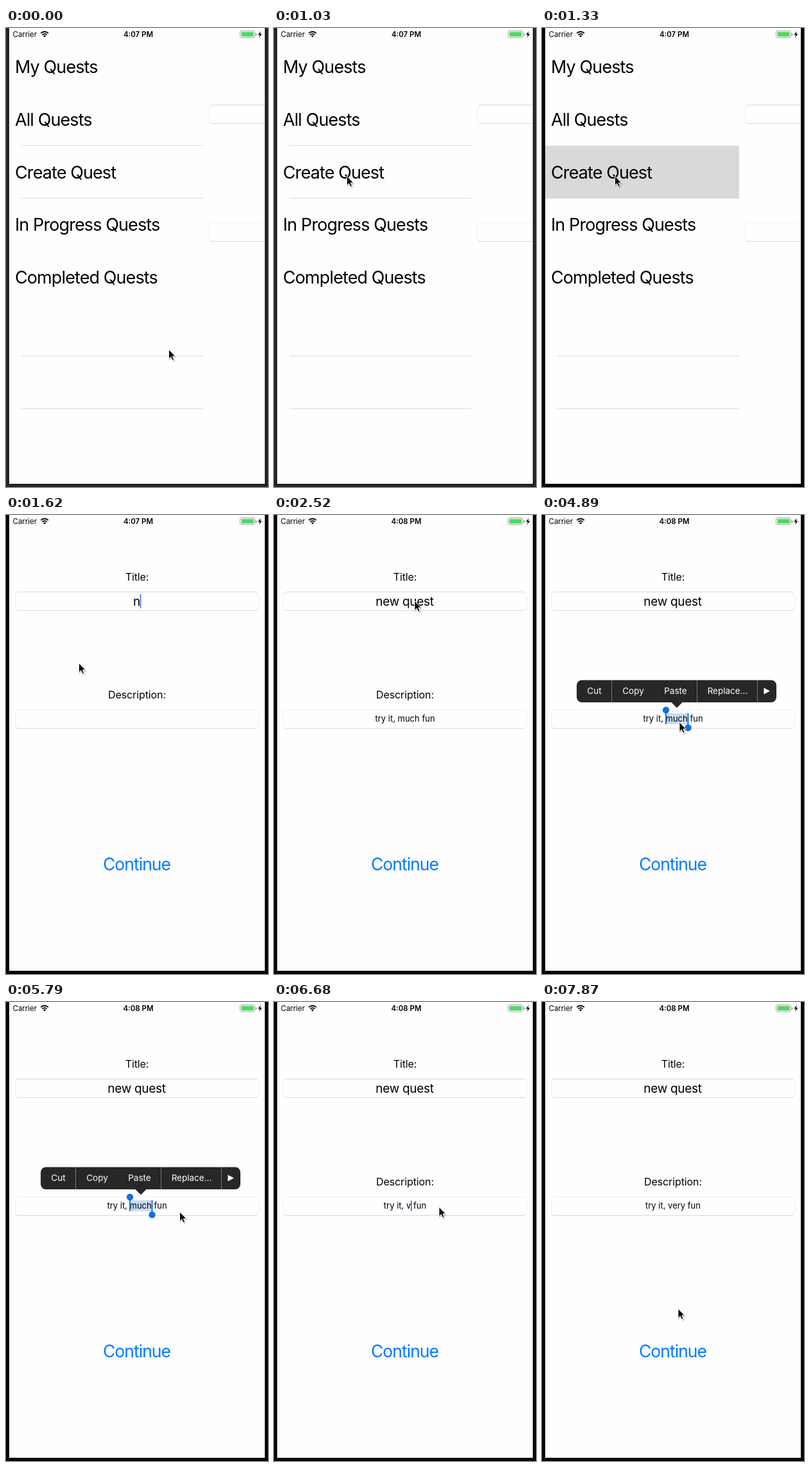
Recreate the animation shown at these times as an HTML page. Size 408 by 713 pixels, loop 8000 ms.

```html
<!DOCTYPE html>
<html lang="en">
<head>
<meta charset="utf-8">
<title>Quest form</title>
<style>
html, body { margin: 0; width: 100%; height: 100%; overflow: hidden; background: #050609; }
svg { display: block; width: 100%; height: 100%; }
text { font-family: Inter, Roboto, sans-serif; font-optical-sizing: none; white-space: pre; }
.mid { text-anchor: middle; }
.big { font-size: 27px; letter-spacing: -.9px; }
.label { font-size: 16px; letter-spacing: -.1px; }
.status { font-size: 11.5px; }
.edit { font-size: 13.5px; fill: #fff; }
.line { fill: none; stroke: #dadada; }
</style>
</head>
<body>
<svg viewBox="0 0 408 713">
  <defs>
    <clipPath id="screen"><rect x="5" width="398" height="708"/></clipPath>
  </defs>
  <rect id="bezel" width="408" height="713"/>
  <g clip-path="url(#screen)">
    <rect x="5" width="398" height="708" fill="#fefefe"/>

    <g id="form">
      <text class="mid label" x="204" y="101.5">Title:</text>
      <rect x="14.5" y="119.5" width="379" height="29" rx="5" fill="none" stroke="#efefef"/>
      <path class="line" d="M17 120.5L19.5 119.5H388.5L391 120.5M17 147.5L19.5 148.5H388.5L391 147.5"/>
      <text id="title" class="mid" x="203.5" y="141" font-size="19" letter-spacing="-.3"></text>
      <text class="mid label" x="204" y="284.5">Description:</text>
      <rect x="14.5" y="302.5" width="379" height="29" rx="5" fill="none" stroke="#efefef"/>
      <path class="line" d="M16 330a5 5 0 0 0 3.5 1.500h369a5 5 0 0 0 3.500-1.500"/>
      <rect id="mark" x="193" y="308" width="34.5" height="17" fill="#c8dcf2"/>
      <text id="desc" class="mid" x="204" y="321" font-size="13"></text>
      <rect id="caret" width="1.7" fill="#4a72e0"/>
      <text class="mid" x="203.5" y="551.5" font-size="26.5" letter-spacing="-.95" fill="#007aff">Continue</text>
    </g>

    <g id="grips" fill="#1370e0">
      <rect x="192" y="303" width="2" height="22"/>
      <circle cx="193" cy="303" r="5.2"/>
      <rect x="226.5" y="308" width="2" height="22"/>
      <circle cx="227.5" cy="330.5" r="5.2"/>
    </g>
    <g id="popup">
      <path d="M62 256.5H357a8 8 0 0 1 8 8V283a8 8 0 0 1-8 8H218.5L210 299.5L201.5 291H62a8 8 0 0 1-8-8V264.5a8 8 0 0 1 8-8Z" fill="#272727"/>
      <path d="M108.5 256.5V291M241.5 256.5V291M335.5 256.5V291" stroke="#777"/>
      <text class="edit mid" x="81.5" y="278">Cut</text>
      <text class="edit mid" x="142" y="278">Copy</text>
      <text class="edit mid" x="208" y="278">Paste</text>
      <text class="edit mid" x="289" y="278">Replace...</text>
      <path d="M345.5 268.5L355 273.5L345.5 278.5Z" fill="#fff"/>
    </g>

    <g id="drawer">
      <rect x="5" width="302" height="708" fill="#fefefe"/>
      <path id="rules" class="line" d="M24 182.5H307M24 264.5H307"/>
      <path class="line" d="M24 509.5H307M24 591.5H307"/>
      <rect id="press" x="5" y="183" width="302" height="82" fill="#d9d9d9"/>
      <g id="rows" class="big"></g>
    </g>

    <text class="status" x="10.5" y="14">Carrier</text>
    <path d="M54.2 8.2A8.2 8.2 0 0 1 65.8 8.2M56.4 10.7A5 5 0 0 1 63.6 10.7" fill="none" stroke="#000" stroke-width="1.9"/>
    <path d="M60 14.4L57.9 12.2A3 3 0 0 1 62.1 12.2Z"/>
    <text id="clock" class="mid status" x="206" y="14" font-weight="600"></text>
    <rect x="364.5" y="4.5" width="23" height="10.5" rx="2.5" fill="none" stroke="#a0a0a0"/>
    <rect x="366.5" y="6.3" width="19.2" height="7" rx="1.2" fill="#4cd964"/>
    <path d="M388.6 8a2 2 0 0 1 0 4Z" fill="#a0a0a0"/>
    <path d="M396.8 5L392.3 10.6H395.2L394 15L398.6 9.2H395.7Z"/>
  </g>

  <g id="cursor">
    <path d="M0 1V17L4 14L6.5 19L10 17.5L8 13H12.5Z" opacity=".2"/>
    <path d="M0 0V14.5L3.3 11.4L5.6 16.6L8 15.6L5.8 10.4H10.3Z" stroke="#fff" stroke-width=".9"/>
  </g>
</svg>
<script>
const LOOP = 8000, TICK = 148.5, LEAD = 15;
const $ = id => document.getElementById(id);
const show = (id, on) => $(id).setAttribute('opacity', Number(on));
const shift = (id, x, y = 0) => $(id).setAttribute('transform', `translate(${x} ${y})`);

// Pointer stops: tick, x, y
const path = [
  [0, 253.5, 499.5], [1, 253.5, 499.5], [2, 254, 505], [4, 200, 365], [6, 122, 238],
  [7, 113.5, 230], [11, 113.5, 230], [14, 180, 170], [17, 219, 133.5], [19, 221, 190],
  [21, 237, 330], [22, 234, 290], [24, 220, 123], [25, 215, 270], [26, 197, 329],
  [27, 193.5, 322.5], [30, 214, 322], [37, 214, 322], [38, 244, 330], [39, 270.5, 326],
  [40, 265, 321], [41, 257, 318.5], [49, 257, 318.5], [50, 302, 304], [51, 270, 390],
  [52, 225, 455], [53, 212, 476.5]
];

// Text stops: tick, content, caret index (-1 for no caret)
const titles = [[0, '', -1], [11, 'n', 1], [12, 'new qu', 6], [13, 'new quest', 9], [14, 'new quest', -1]];
const descs = [
  [0, '', -1], [14, 'try', 3], [15, 'try it, mu', 10], [16, 'try it, much fun', 16],
  [17, 'try it, much fun', -1], [26, 'try it, much fun', 16], [32, 'try it, much fun', -1],
  [44, 'try it,  fun', 8], [45, 'try it, v fun', 9], [46, 'try it, ver fun', 11],
  [47, 'try it, very fun', 12], [51, 'try it, very fun', -1]
];

['My Quests', 'All Quests', 'Create Quest', 'In Progress Quests', 'Completed Quests'].forEach((name, i) => {
  const row = document.createElementNS('http://www.w3.org/2000/svg', 'text');
  row.textContent = name;
  row.setAttribute('x', 14);
  row.setAttribute('y', 70 + i * 81.8);
  $('rows').append(row);
});

const latest = (stops, n) => stops.filter(s => s[0] <= n).pop();

function pointAt(n) {
  const i = path.findIndex(p => p[0] > n);
  if (i < 0) return path[path.length - 1].slice(1);
  const [a, ax, ay] = path[i - 1], [b, bx, by] = path[i];
  const k = (n - a) / (b - a);
  return [ax + (bx - ax) * k, ay + (by - ay) * k];
}

function setField(id, [, content, index], top, height) {
  const el = $(id), caret = $('caret');
  if (el.textContent !== content) el.textContent = content;
  if (index < 1) return;
  caret.setAttribute('x', el.getEndPositionOfChar(index - 1).x - .3);
  caret.setAttribute('y', top);
  caret.setAttribute('height', height);
  show('caret', true);
}

function draw(t) {
  const n = Math.floor((t + LEAD) / TICK);
  const open = n < 10 ? 302 : n < 11 ? 150 : 0;
  const pressed = n >= 9;
  const selecting = n >= 32 && n < 44;

  $('bezel').setAttribute('fill', pressed ? '#050609' : '#242427');
  $('clock').textContent = n < 13 ? '4:07 PM' : '4:08 PM';
  shift('form', open);
  shift('drawer', open - 302);
  show('drawer', open > 0);
  show('press', pressed);
  show('rules', !pressed);

  show('caret', false);
  setField('title', latest(titles, n), 123, 22);
  setField('desc', latest(descs, n), 308.5, 16.5);
  show('mark', selecting);
  show('grips', selecting);
  show('popup', selecting ? (n < 33 ? .5 : 1) : 0);

  shift('cursor', ...pointAt(n));
}

function loop() {
  draw(performance.now() % LOOP);
  requestAnimationFrame(loop);
}
loop();
</script>
</body>
</html>
```
